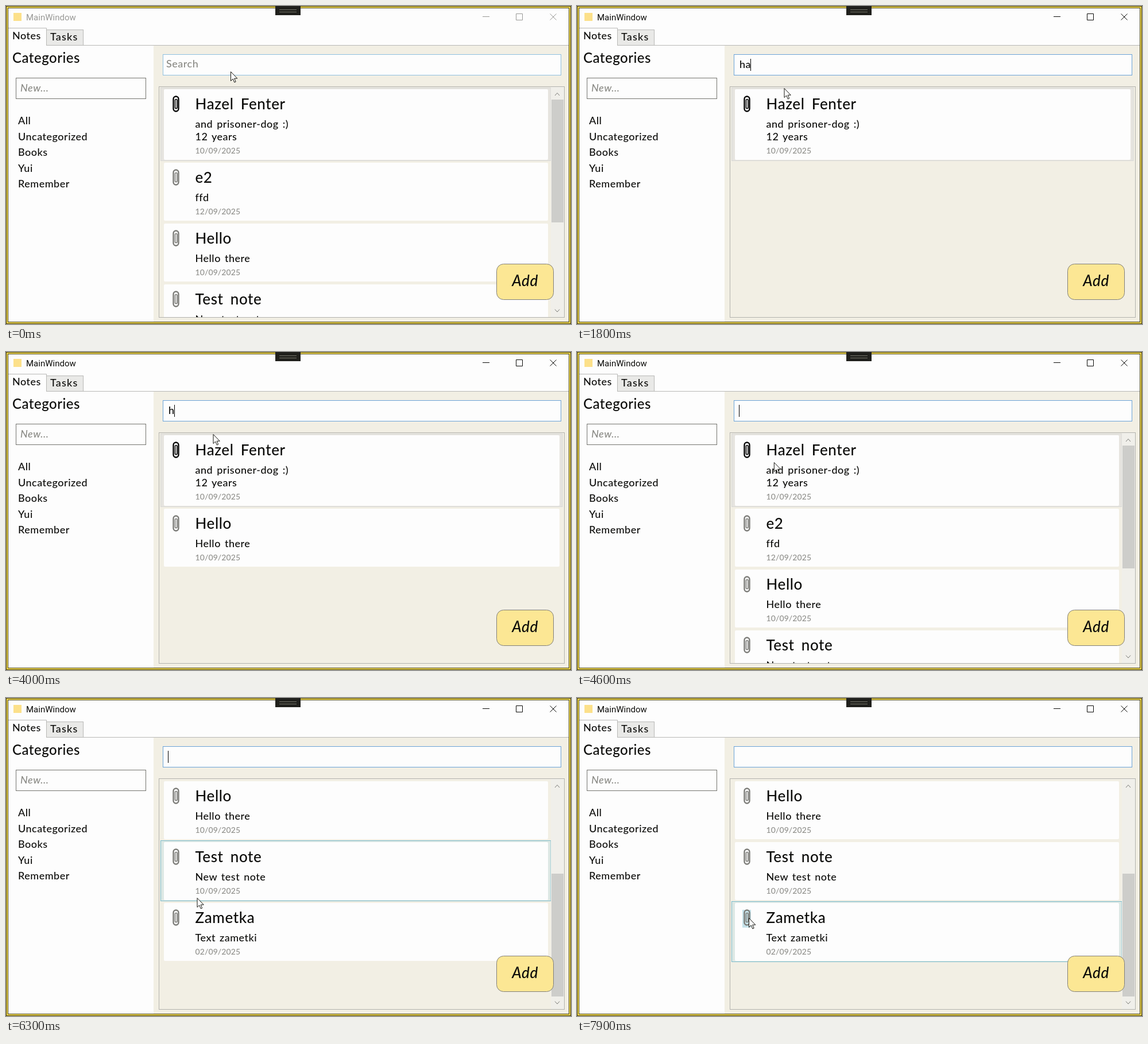
An HTML page for the animation above (8000 ms loop, 984 px wide and 554 px high).

```html
<!DOCTYPE html>
<html lang="en">
<head>
<meta charset="utf-8">
<title>Notes</title>
<style>
  html, body { margin: 0; width: 100%; height: 100%; overflow: hidden; background: #fdfdfd; }
  svg { display: block; width: 100vw; height: 100vh; }
  text { font: 500 18px Lato, "Open Sans", sans-serif; letter-spacing: .5px; word-spacing: 2px; fill: #0c0c0a; white-space: pre; }
  .h { font-size: 26px; letter-spacing: .6px; word-spacing: 5px; }
  .cat { font-size: 24px; }
  .date { font-size: 14px; letter-spacing: .1px; fill: #8f8f8b; }
  .hint { fill: #8a8a85; }
  .slant { font-style: italic; }
  .bar { font: 15px Roboto, "Open Sans", sans-serif; letter-spacing: 0; }
  .line { fill: none; stroke-width: 1; }
</style>
</head>
<body>
<svg viewBox="0 0 984 554">
  <defs>
    <clipPath id="view"><rect x="267" y="141" width="705" height="401"/></clipPath>
  </defs>
  <!-- window frame -->
  <rect width="984" height="554" fill="#453c08"/>
  <rect x="1" y="1" width="982" height="552" fill="#ecd554"/>
  <rect x="3" y="3" width="978" height="548" fill="#4d460f"/>
  <rect x="4" y="4" width="976" height="546" fill="#fdfdfd"/>
  <rect x="469" width="44" height="16" fill="#20201c"/>
  <path class="line" d="M476 6.5H506M476 10.5H506" stroke="#77776c"/>
  <!-- title bar -->
  <rect x="13" y="12" width="14" height="14" fill="#fce08a"/>
  <text id="title" class="bar" x="35" y="25">MainWindow</text>
  <path id="buttons" class="line" d="M830 18.5H842M888.5 13.5H899.5V24.5H888.5ZM947.5 13.5L958.5 24.5M958.5 13.5L947.5 24.5"/>
  <!-- tabs -->
  <rect x="257" y="69" width="723" height="481" fill="#f2efe4"/>
  <path class="line" d="M4 38.5H70.5V68.5H980" stroke="#b8b8b6"/>
  <rect x="70.5" y="41.5" width="64" height="27" fill="#e9e9e7" stroke="#b8b8b6"/>
  <text x="11" y="58">Notes</text>
  <text x="77" y="60" style="letter-spacing:1.2px">Tasks</text>
  <!-- sidebar -->
  <text class="cat" x="11" y="99">Categories</text>
  <rect x="17.5" y="125.5" width="226" height="36" fill="#fdfdfd" stroke="#74746f"/>
  <text class="hint slant" x="25" y="149">New...</text>
  <g id="cats"></g>
  <!-- search -->
  <rect id="box" x="273.5" y="84.5" width="693" height="36" fill="#fdfdfd"/>
  <text id="hint" class="hint" x="279" y="107">Search</text>
  <text id="typed" x="283" y="108"></text>
  <path id="caret" class="line" d="M.5 92V113" stroke="#000"/>
  <!-- list -->
  <rect class="line" x="266.5" y="140.5" width="706" height="402" stroke="#b2b2ae"/>
  <g id="list" clip-path="url(#view)"></g>
  <g id="scroll">
    <rect x="949" y="141" width="23" height="401" fill="#f0efea"/>
    <path class="line" d="M956 156L960 151.5L964 156M956 528.5L960 533L964 528.5" stroke="#7a7a76"/>
    <rect id="thumb" x="950" width="21" height="214" fill="#cdcdca"/>
  </g>
  <rect x="854.5" y="449.5" width="99" height="62" rx="12" fill="#fce794" stroke="#82807a"/>
  <text class="h slant" x="904" y="488" text-anchor="middle">Add</text>
  <path id="mouse" d="M.5 .5V16.5L4.2 13L6.8 19L9.2 18L6.7 12.2H11.8Z" fill="#fdfdfd" stroke="#15150f"/>
</svg>
<script>
const LOOP = 8000, FOCUS = 650, SCROLL = 6200, BLINK = 530;
const $ = id => document.getElementById(id);

const notes = [
  { title: "Hazel Fenter", body: ["and prisoner-dog :)", "12 years"], date: "10/09/2025", selected: true },
  { title: "e2", body: ["ffd"], date: "12/09/2025" },
  { title: "Hello", body: ["Hello there"], date: "10/09/2025" },
  { title: "Test note", body: ["New test note"], date: "10/09/2025" },
  { title: "Zametka", body: ["Text zametki"], date: "02/09/2025" }
];

// [time, search text]
const keys = [
  [FOCUS, ""], [1400, "h"], [1700, "ha"], [2000, "haz"], [2280, "haze"], [2450, "hazel"],
  [3400, "haze"], [3550, "haz"], [3700, "ha"], [3850, "h"], [4080, ""]
];

// [start, end, x, y]
const moves = [
  [0, 0, 391, 114], [100, 600, 374, 110], [650, 800, 360.5, 143], [4300, 5100, 305, 297],
  [5500, 5900, 332.5, 348], [6400, 7600, 299, 383]
];

$("cats").innerHTML = ["All", "Uncategorized", "Books", "Yui", "Remember"]
  .map((name, i) => `<text x="21" y="${206 + i * 27.5}">${name}</text>`).join("");

function mouseAt(t) {
  let [, , x, y] = moves[0];
  for (const [start, end, tx, ty] of moves.slice(1)) {
    if (t < start) break;
    const p = Math.min(1, (t - start) / (end - start));
    const e = p * p * (3 - 2 * p);
    x += (tx - x) * e;
    y += (ty - y) * e;
  }
  return { x, y };
}

function pin(top, color, lit) {
  const back = lit ? `<rect x="-2" y="1" width="15" height="31" fill="#c6e2ea"/>` : "";
  return `<g transform="translate(290 ${top + 11})">${back}
    <g class="line" stroke="${color}">
      <rect x="1.5" y="1.5" width="9" height="26" rx="4.5" stroke-width="2.4"/>
      <rect x="4.5" y="6.5" width="3.5" height="16" rx="1.75" stroke-width="1.6"/>
    </g></g>`;
}

function row(note, top, right, mouse) {
  const extra = (note.body.length - 1) * 22;
  const height = 101 + extra;
  const over = mouse.y >= top - 3 && mouse.y < top + height + 2 && mouse.x > 269 && mouse.x < right + 5;
  const lit = over && mouse.x >= 288 && mouse.x <= 303 && mouse.y >= top + 11 && mouse.y <= top + 43;
  const frame = note.selected ? ["#e6e4df", "#d8d8d6"] : over ? ["#dde8e4", "#7cbccc"] : null;
  const halo = frame ? `<rect x="269.5" y="${top - 2.5}" width="${right - 264.5}" height="${height + 4}" fill="${frame[0]}" stroke="${frame[1]}"/>` : "";
  const lines = note.body.map((s, i) => `<text x="329.5" y="${top + 67 + i * 22}">${s}</text>`).join("");
  return `${halo}<rect x="275" y="${top}" width="${right - 275}" height="${height}" rx="2" fill="#fdfdfd"/>
    ${pin(top, note.selected ? "#050505" : "#7c7c78", lit)}
    <text class="h" x="329.5" y="${top + 35}">${note.title}</text>${lines}
    <text class="date" x="329.5" y="${top + 90 + extra}">${note.date}</text>`;
}

function drawList(query, scrolled, mouse) {
  const found = notes.filter(n => (n.title + " " + n.body.join(" ")).toLowerCase().includes(query));
  const long = found.length > 3;
  let top = 145, html = "";
  for (const note of found.slice(scrolled ? 2 : 0)) {
    html += row(note, top, long ? 944 : 964, mouse);
    top += 106 + (note.body.length - 1) * 22;
  }
  if (html !== drawList.last) $("list").innerHTML = drawList.last = html;
  $("scroll").style.display = long ? "" : "none";
  $("thumb").setAttribute("y", scrolled ? 306 : 163);
}

function draw(t) {
  const focused = t >= FOCUS;
  const [since, query] = keys.filter(k => k[0] <= t).pop() || [0, ""];
  const mouse = mouseAt(t);
  const ink = focused ? "#0c0c0a" : "#999996";

  $("title").style.fill = ink;
  $("buttons").setAttribute("stroke", ink);
  $("box").setAttribute("stroke", focused ? "#6ba3d8" : "#8fc0e0");
  $("hint").style.display = focused ? "none" : "";
  $("typed").textContent = query;

  const width = query ? $("typed").getComputedTextLength() : 0;
  const blinkOn = Math.floor((t - since) / BLINK) % 2 === 0;
  $("caret").style.display = focused && blinkOn ? "" : "none";
  $("caret").setAttribute("transform", `translate(${Math.round(282 + width)} 0)`);

  drawList(query, t >= SCROLL, mouse);
  $("mouse").setAttribute("transform", `translate(${mouse.x} ${mouse.y})`);
}

const begin = performance.now();
function tick() {
  draw((performance.now() - begin) % LOOP);
  requestAnimationFrame(tick);
}
tick();
</script>
</body>
</html>
```
